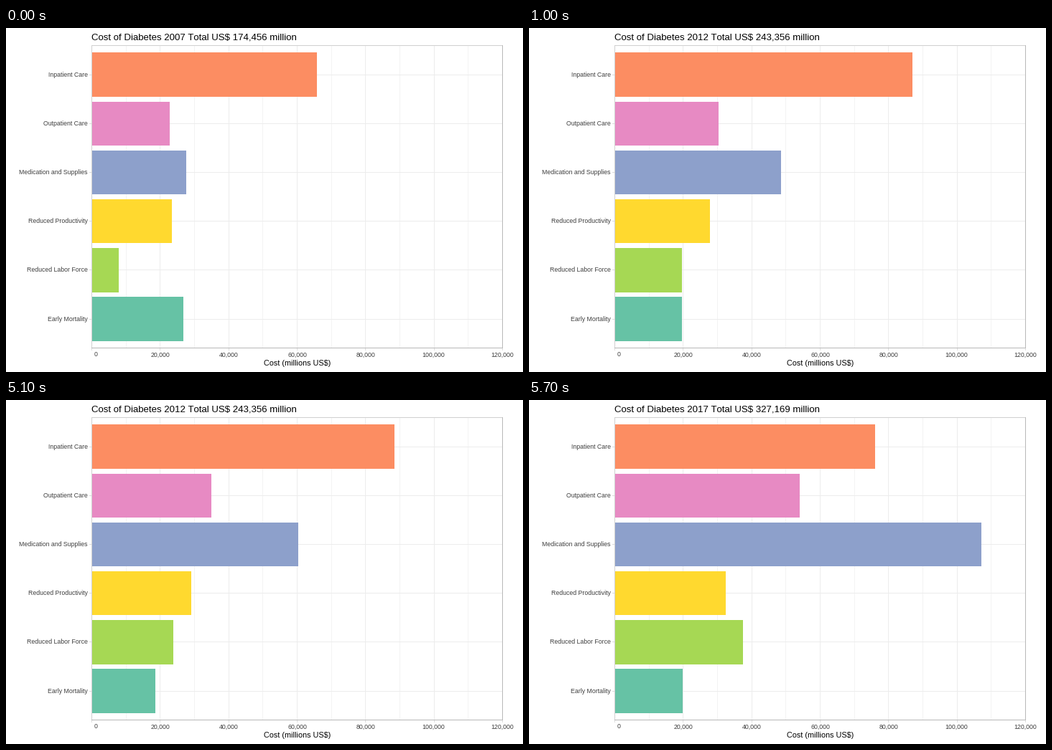
A matplotlib script that plays this animation: 720 by 480 pixels, repeating every 8000 ms.

```python
import matplotlib.pyplot as plt
from matplotlib.animation import FuncAnimation
from matplotlib.patches import Rectangle

W, H, DPI = 720, 480, 100
LEFT, RIGHT, TOP, BOTTOM = 119.3, 691.3, 24.2, 446.98
X_MAX = 120
X_SCALE = (RIGHT - LEFT) / X_MAX
ROW = (BOTTOM - TOP) / 6.2
STEPS = 9
STARTS = (4, 48)          # last resting frame before each transition

plt.rcParams["font.family"] = "Liberation Sans"
plt.rcParams["text.kerning_factor"] = 6

MAJOR, MINOR, TICK = "#ECECEC", "#F3F3F3", "#DCDCDC"
EDGE_LIGHT, EDGE_DARK, LABEL = "#D0D0D0", "#B8B8B8", "#404040"

LABELS = ["Inpatient Care", "Outpatient Care", "Medication and Supplies",
          "Reduced Productivity", "Reduced Labor Force", "Early Mortality"]
COLORS = ["#FC8D62", "#E78AC3", "#8DA0CB", "#FFD92F", "#A6D854", "#66C2A5"]
# year, total, cost per category in thousands of millions
STATES = [
    (2007, 174456, [65.83, 22.77, 27.65, 23.4, 7.9, 26.85]),
    (2012, 243356, [90.7, 31.75, 52.3, 28.5, 21.6, 18.45]),
    (2017, 327169, [76.1, 54.0, 107.1, 32.4, 37.5, 19.9]),
]

fig = plt.figure(figsize=(W / DPI, H / DPI), dpi=DPI, facecolor="white")
ax = fig.add_axes([0, 0, 1, 1])
ax.set_xlim(0, W)
ax.set_ylim(H, 0)
ax.axis("off")


def box(x0, y0, x1, y1, color, z):
    """Pixel-aligned filled rectangle."""
    patch = Rectangle((x0, y0), x1 - x0, y1 - y0, facecolor=color,
                      linewidth=0, antialiased=False, zorder=z)
    return ax.add_patch(patch)


def text(x, y, s, px, color="black", ha="left"):
    return ax.text(x, y, s, fontsize=px * 72 / DPI, color=color,
                   ha=ha, va="baseline", zorder=6)


def row_center(i):
    return TOP + (0.6 + i) * ROW


def snap(v):
    """Pixel that holds a thin line at position v."""
    return int(v + 0.1)


def ease(t):
    """Cubic in-out."""
    return 4 * t ** 3 if t < 0.5 else 1 - 4 * (1 - t) ** 3


def draw_panel():
    x0, x1, y0, y1 = int(LEFT), int(RIGHT), int(TOP), int(BOTTOM)
    for k in range(1, 12):
        x = snap(LEFT + 10 * k * X_SCALE)
        box(x, y0, x + 1, y1, MINOR if k % 2 else MAJOR, 1)
    for i, label in enumerate(LABELS):
        y = snap(row_center(i))
        box(x0, y, x1, y + 1, MAJOR, 1)
        box(x0 - 3, y, x0, y + 1, TICK, 1)
        text(114, y + 3.3, label, 8.8, LABEL, "right")
    for v in range(0, X_MAX + 1, 20):
        x = LEFT + v * X_SCALE
        label = f"{v * 1000:,}"
        box(snap(x), y1 + 1, snap(x) + 1, y1 + 4, TICK, 1)
        text(x - 0.5 + 1.1 * (7 - len(label)), 458.4, label, 8.8, LABEL, "center")
    box(x0, y0, x1 + 1, y0 + 1, EDGE_LIGHT, 5)
    box(x0, y0, x0 + 1, y1 + 1, EDGE_LIGHT, 5)
    box(x1, y0, x1 + 1, y1 + 1, EDGE_DARK, 5)
    box(x0, y1, x1 + 1, y1 + 1, EDGE_DARK, 5)
    text((LEFT + RIGHT) / 2, 471, "Cost (millions US$)", 10.8, ha="center")


draw_panel()
bars = []
for i, color in enumerate(COLORS):
    c = row_center(i)
    bars.append(box(119, round(c - 0.45 * ROW), 120, round(c + 0.45 * ROW), color, 4))
title = text(119, 16.2, "", 13.2)


def update(frame):
    seg = int(frame > STARTS[1])
    t = min(max(frame - STARTS[seg], 0), STEPS) / STEPS
    e = ease(t)
    start, end = STATES[seg], STATES[seg + 1]
    for bar, a, b in zip(bars, start[2], end[2]):
        bar.set_width(round(LEFT + (a + (b - a) * e) * X_SCALE) - 119)
    year, total, _ = end if t > 0.5 else start
    title.set_text(f"Cost of Diabetes {year} Total US\\$ {total:,} million")
    return [*bars, title]


anim = FuncAnimation(fig, update, frames=80, interval=100,
                     repeat=True, repeat_delay=0, blit=False)
plt.show()
```
